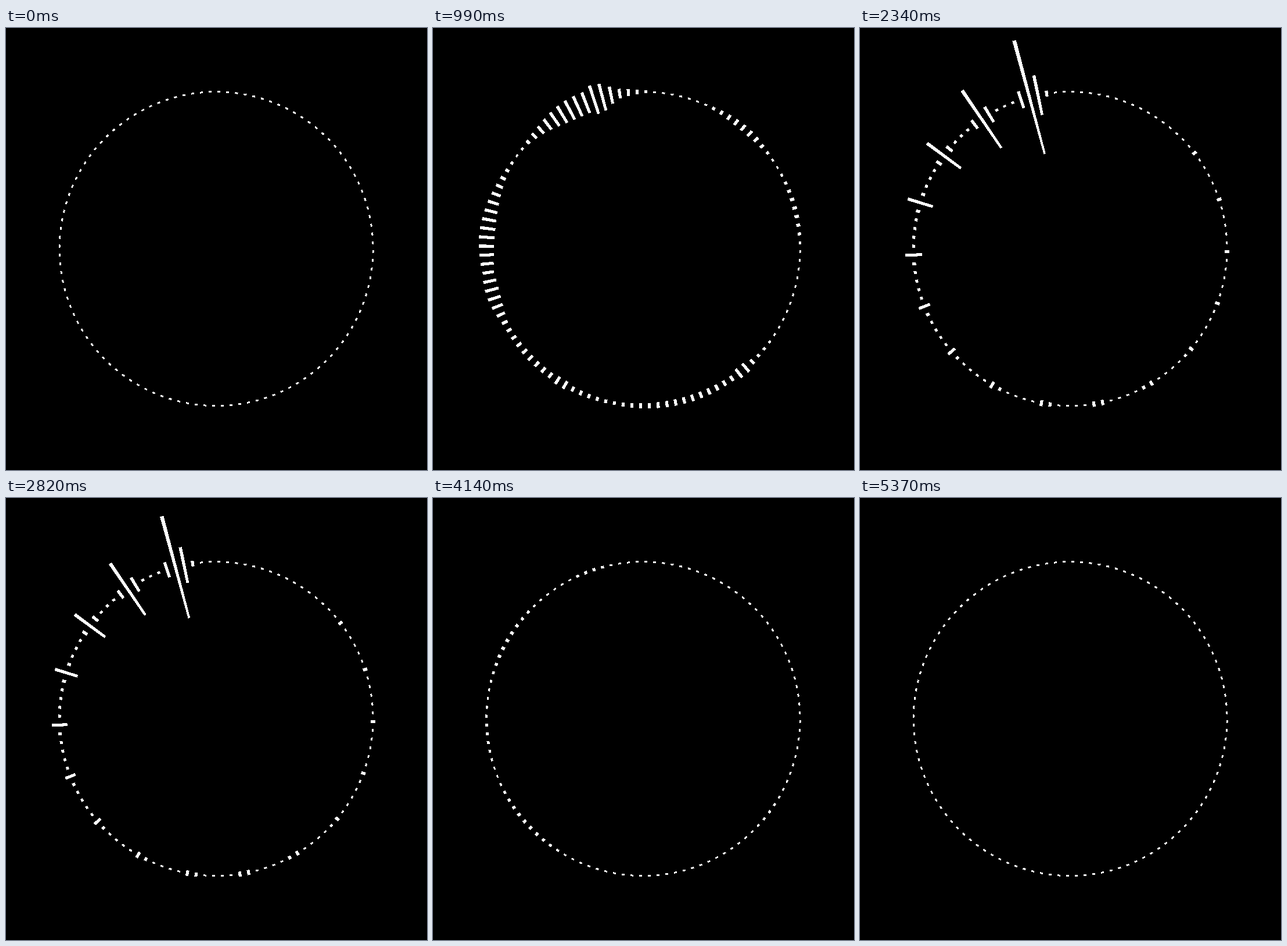
An HTML page that plays this animation: 725 by 760 pixels, repeating every 5.4 s.

```html
<!DOCTYPE html>
<html lang="en">
<head>
<meta charset="utf-8">
<title>Radial spectrum</title>
<style>
  html, body { margin: 0; width: 100%; height: 100%; overflow: hidden; background: #000; }
  svg { display: block; width: 725px; height: 760px; }
  path { fill: #fff; stroke: #fff; stroke-width: 1; stroke-linejoin: round; shape-rendering: crispEdges; }
</style>
</head>
<body>
<svg viewBox="0 0 725 760"><path id="bars"/></svg>
<script>
const LOOP = 5400, STEP = 30;
const COUNT = 112, CX = 362.1, CY = 379.7, RADIUS = 270;
const DEG = Math.PI / 180, OFFSET = 0.98 * DEG, HALF_WIDTH = 0.44 * DEG;
const REST = 1.5, EDGE = 0.5, LEAK = 1.9;

// A pure tone leaks into the bars beside it; a band of noise is a soft bump.
const tone = (center, half) => i =>
  half * Math.exp(LEAK * (Math.abs(Math.round(center) - center) - Math.abs(i - center)));
const band = (center, half, width) => i => half * Math.exp(-(((i - center) / width) ** 2));

const harmonics = (spacing, shift, level) =>
  Array.from({ length: 16 }, (_, n) => tone(spacing * (n + 1) + shift, level(n)));

// Half bar lengths, counted counterclockwise from the top.
const spectrum = (...parts) => Array.from({ length: COUNT }, (_, i) =>
  Math.max(REST, ...parts.map(part => part(i))));

const haze = band(26, 2.6, 32);

const silence = spectrum();

const breath = spectrum(
  band(5.7, 26, 2.3), band(8, 19, 5.5), band(27, 13.5, 7), band(33, 12, 4.5),
  band(43, 5.5, 12), band(46.5, 8, 1.8), band(62, 5.8, 11), band(68.5, 10, 1.8),
  band(89, 4, 5), band(100, 6, 4.5)
);

const chord = spectrum(haze,
  tone(9.5, 41), tone(12.3, 8), tone(18.8, 109), band(20.7, 7, 1.2),
  tone(25.8, 15), tone(39.2, 18), tone(59.7, 8), tone(79.9, 10)
);

const low = spectrum(haze,
  ...harmonics(6.08, -1.3, n => 4 + 97 * Math.exp(-0.55 * n))
);

const pluck = spectrum(haze,
  ...harmonics(6, -1, () => 5),
  band(5.5, 9, 2.4), tone(9.1, 82), tone(11, 33), band(20, 7, 9),
  tone(17, 58), tone(19.3, 24), tone(23, 37), tone(35, 39),
  band(39, 8, 2.3), tone(47.2, 17), tone(59.6, 6), tone(71.3, 23), tone(95.8, 9)
);

const soft = spectrum(
  band(6.5, 2.8, 3), band(19, 3.2, 7), band(30, 2.5, 5), band(41, 3.2, 7), band(73, 2.2, 4)
);

// time, spectrum, gain
const score = [
  [0, silence, 1], [150, silence, 1],
  [330, breath, 1.3], [600, breath, 0.7], [990, breath, 1], [1260, breath, 0.4],
  [1380, chord, 1.03], [1560, chord, 1], [1890, chord, 0.74],
  [2010, low, 0.8], [2340, low, 1], [3030, low, 0.85],
  [3150, pluck, 1], [3300, pluck, 1], [3600, pluck, 0.62],
  [4140, soft, 1], [4260, pluck, 0.72], [4590, pluck, 0.2],
  [4740, soft, 0.5], [5340, silence, 1], [LOOP, silence, 1]
];

function halfLength(i, t) {
  const k = score.findIndex(key => key[0] > t);
  const [t0, a, gainA] = score[k - 1], [t1, b, gainB] = score[k];
  const from = (a[i] - REST) * gainA, to = (b[i] - REST) * gainB;
  return REST + from + (to - from) * (t - t0) / (t1 - t0);
}

const point = (r, angle) =>
  (CX - r * Math.sin(angle)).toFixed(2) + ' ' + (CY - r * Math.cos(angle)).toFixed(2);

function wedge(i, half) {
  const angle = i * 2 * Math.PI / COUNT - OFFSET;
  const left = angle + HALF_WIDTH, right = angle - HALF_WIDTH;
  const outer = RADIUS + half - EDGE, inner = RADIUS - half + EDGE;
  return `M${point(outer, left)}L${point(outer, right)}L${point(inner, right)}L${point(inner, left)}Z`;
}

const bars = document.getElementById('bars');

function render(ms) {
  const t = Math.floor((ms % LOOP) / STEP) * STEP;
  let d = '';
  for (let i = 0; i < COUNT; i++) d += wedge(i, halfLength(i, t));
  bars.setAttribute('d', d);
}

const start = performance.now();
function tick() {
  render(performance.now() - start);
  requestAnimationFrame(tick);
}
tick();
</script>
</body>
</html>
```
